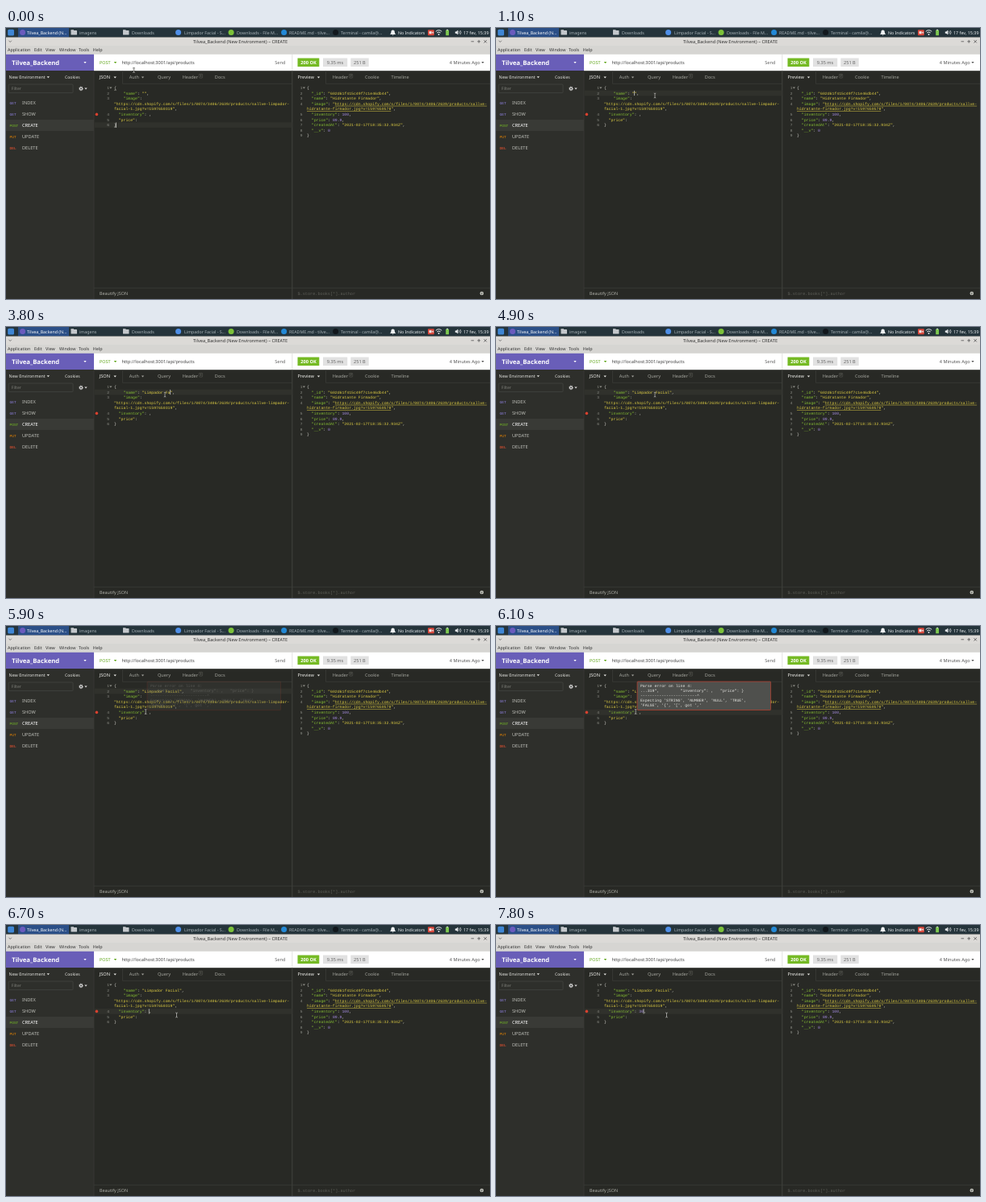
Write an HTML page that moves like this. It is 600 by 337 pixels and loops after 8000 ms.

```html
<!DOCTYPE html>
<html lang="en">
<head>
<meta charset="utf-8">
<title>API client</title>
<style>
html, body { margin: 0; width: 100%; height: 100%; overflow: hidden; background: #282925; }
svg { display: block; width: 100vw; height: 100vh; }
text { white-space: pre; font-family: "Noto Sans", "Open Sans", sans-serif; text-rendering: geometricPrecision; }
.mono { font-family: "Liberation Mono", "DejaVu Sans Mono", monospace; }
.key { fill: #86bf33; }
.str { fill: #dccb43; }
.num { fill: #a48be0; }
.pun { fill: #d6d6d0; }
.url { text-decoration: underline; text-decoration-thickness: .5px; }
</style>
</head>
<body>
<svg id="stage" viewBox="0 0 600 337" preserveAspectRatio="none"></svg>
<script>
const LOOP = 8000;
const CW = 2.9, ROW = 6.6, CODE_SIZE = CW / 0.6;
const LEFT = 133.9, RIGHT = 373;
const stage = document.getElementById('stage');

const rowTop = row => 71.1 + row * ROW;
const rect = (x, y, w, h, fill, more = '') =>
  `<rect x="${x}" y="${y}" width="${w}" height="${h}" fill="${fill}" ${more}/>`;
const disc = (x, y, r, fill, more = '') =>
  `<circle cx="${x}" cy="${y}" r="${r}" fill="${fill}" ${more}/>`;
const path = (d, stroke, width = 0.8, more = '') =>
  `<path d="${d}" fill="none" stroke="${stroke}" stroke-width="${width}" ${more}/>`;
const solid = (d, fill) => `<path d="${d}" fill="${fill}"/>`;
const text = (x, y, str, size, fill, more = '') =>
  `<text x="${x}" y="${y}" font-size="${size}" fill="${fill}" ${more}>${str}</text>`;
const mono = (x, y, str, size, fill, more = '') =>
  text(x, y, str, size, fill, 'class="mono" ' + more);
const arrow = (x, y, fill) => solid(`M${x - 1.7} ${y - 0.9}h3.4l-1.7 2z`, fill);

// parts: alternating class name and text
function code(x, row, indent, ...parts) {
  let spans = '';
  for (let i = 0; i < parts.length; i += 2) {
    const [cls, id] = parts[i].split('#');
    spans += `<tspan class="${cls}" ${id ? `id="${id}"` : ''}>${parts[i + 1]}</tspan>`;
  }
  return mono(x + indent * CW, 76 + row * ROW, spans, CODE_SIZE, '#d6d6d0');
}

function gutter(x, rows) {
  return rows.map((row, i) =>
    mono(x, 75.9 + row * ROW, i + 1, 4.6, '#90918a', 'text-anchor="end"')).join('') +
    arrow(x + 1.8, 74.4, '#90918a');
}

function desktopPanel() {
  const lit = '#eef1f3';
  const tasks = [
    [17, 26, '#6a5bbd', 'Tilvea_Backend (N...'],
    [80.5, 91, '#c3c7cb', 'imagens'],
    [145, 156, '#c3c7cb', 'Downloads'],
    [210, 221, '#4f8fe8', 'Limpador Facial - S...'],
    [275.5, 286, '#7cc23a', 'Downloads - File M...'],
    [341, 351, '#2489d6', 'README.md - tilve...'],
    [405, 415, '#12171c', 'Terminal - camila@...']
  ];
  let s = rect(0, 0, 600, 11.5, '#25343b') + rect(15, 0, 63, 11.5, '#2b4f87') +
    rect(2.2, 1.8, 7.8, 7.8, '#3f86d4', 'rx="1.5"');
  tasks.forEach(([ix, tx, fill, label], i) => {
    s += i === 1 || i === 2
      ? rect(ix, 3, 7.5, 5.6, fill, 'rx=".6"') + rect(ix, 2.2, 3.5, 1.5, fill)
      : disc(ix + 3.6, 5.6, 3.5, fill);
    s += text(tx, 7.5, label, 5.3, i ? '#a9b3b8' : '#ffffff');
  });
  return s +
    solid('M476 8q1.4-1 1.4-3.2a2.2 2.2 0 0 1 4.4 0q0 2.2 1.4 3.2zM478.6 8.5h2l-1 1z', lit) +
    text(486, 7.5, 'No Indicators', 5.25, lit) +
    rect(523, 2.2, 7.8, 7, '#d9463a', 'rx=".8"') + rect(524.6, 4.2, 3, 3, lit) +
    solid('M528 5.7l1.9-1.5v3z', lit) +
    path('M532.8 4.3q3.7-3.2 7.4 0M534.3 6q2.2-1.9 4.4 0', lit, 1) + disc(536.5, 8, 0.9, lit) +
    rect(545.2, 2.6, 3.8, 6.6, '#7ec850', 'rx=".5"') + rect(546.2, 1.8, 1.8, 1, lit) +
    solid('M556.8 4.5h1.5l2-1.9v6l-2-1.9h-1.5z', lit) +
    path('M561.5 4.1q1.2 1.5 0 3M563 3q2.2 2.6 0 5.2', lit, 0.7) +
    text(567, 7.5, '17 fev, 15:39', 5.4, lit);
}

function windowBars() {
  const menu = [[2, 'Application'], [35, 'Edit'], [49, 'View'], [66, 'Window'], [90, 'Tools'], [107.8, 'Help']];
  return rect(0, 11.5, 600, 10.5, '#dcdad7') + rect(0, 22, 600, 11, '#d6d5d2') +
    path('M3.5 15.7l1.7 1.8 1.7-1.8', '#666') +
    text(290.5, 18.5, 'Tilvea_Backend (New Environment) – CREATE', 5.6, '#333', 'text-anchor="middle"') +
    path('M576.5 16.8h3.6M584.3 16.8h3.8M586.2 14.9v3.8M592.5 15.1l3.4 3.4M595.9 15.1l-3.4 3.4', '#555', 0.8) +
    menu.map(([x, label]) => text(x, 29.1, label, 5.4, '#333')).join('');
}

function toolbar() {
  return rect(0, 32.8, 109, 20.4, '#695eb8') + rect(109, 32.8, 491, 20.4, '#fff') +
    text(7.3, 45.6, 'Tilvea_Backend', 7.7, '#fff', 'font-weight="600"') + arrow(98, 43, '#fff') +
    text(116, 45, 'POST', 5.4, '#59a210') + arrow(135.5, 43, '#59a210') +
    text(143.5, 45, 'http://localhost:3001/api/products', 5.62, '#444') +
    text(333.2, 45, 'Send', 5.7, '#666') +
    path('M354.8 32.8v20.4', '#d5d5d5', 0.7) +
    rect(361.5, 37.5, 26.8, 10.6, '#75ba24') +
    text(375, 45, '200 OK', 5.7, '#fff', 'font-weight="600" text-anchor="middle"') +
    rect(393, 37.5, 30.2, 10.6, '#e1e1e1') +
    text(408, 45, '9.35 ms', 5.6, '#666', 'text-anchor="middle"') +
    rect(427.3, 37.5, 22.4, 10.6, '#e1e1e1') +
    text(438.4, 45, '251 B', 5.6, '#666', 'text-anchor="middle"') +
    text(549.8, 45, '4 Minutes Ago', 5.6, '#555') + arrow(591, 43, '#555');
}

function sidebar() {
  const items = [
    ['GET', 'INDEX', '#8f80e0'], ['GET', 'SHOW', '#8f80e0'], ['POST', 'CREATE', '#75ba24'],
    ['PUT', 'UPDATE', '#ec8702'], ['DEL', 'DELETE', '#ff5631']
  ];
  return rect(0, 53.2, 109, 284, '#2e2f2b') +
    text(3.6, 63, 'New Environment', 5.4, '#e4e4e0') + arrow(52.3, 61.1, '#e4e4e0') +
    text(73, 63, 'Cookies', 5.1, '#e4e4e0') +
    rect(3.2, 70, 79.8, 10.6, 'none', 'rx="1" stroke="#4b4c47" stroke-width=".6"') +
    text(6.8, 77.2, 'Filter', 5.1, '#7f807a') +
    disc(93, 75.4, 1.5, 'none', 'stroke="#ddd" stroke-width="1.1"') +
    disc(93, 75.4, 2.3, 'none', 'stroke="#ddd" stroke-width=".9" stroke-dasharray=".9 .9"') +
    arrow(99, 75.3, '#ddd') +
    rect(0, 114, 109, 14, '#393a36') +
    items.map(([verb, name, fill], i) =>
      mono(4.5, 94.7 + 14 * i, verb, 4.5, fill) +
      text(20, 95.1 + 14 * i, name, 5.65, i === 2 ? '#fff' : '#bfc0ba')).join('') +
    path('M109 53.2V337', '#3d3e39', 0.6);
}

function tabs() {
  const dim = '#a3a49d', lit = '#eeeeea', edge = '#41423d';
  const badge = (x, n) => rect(x - 2.1, 57.3, 4.2, 4.8, 'none', 'rx=".7" stroke="#62635d" stroke-width=".5"') +
    text(x, 61.1, n, 3.7, dim, 'text-anchor="middle"');
  return text(115.7, 63.3, 'JSON', 5.7, lit) + arrow(135.2, 61.3, lit) +
    text(152.7, 63.3, 'Auth', 5.5, dim) + arrow(169.5, 61.3, dim) +
    text(188, 63.3, 'Query', 5.6, dim) + text(218.7, 63.3, 'Header', 5.6, dim) + badge(241.5, 1) +
    text(258.8, 63.3, 'Docs', 5.6, dim) +
    text(361.5, 63.3, 'Preview', 5.6, lit) + arrow(387.5, 61.3, lit) +
    text(404.7, 63.3, 'Header', 5.6, dim) + badge(427.6, 7) +
    text(445, 63.3, 'Cookie', 5.5, dim) + text(477.5, 63.3, 'Timeline', 5.5, dim) +
    path('M144.5 53.2V69.3H354.5M396.5 53.2V69.3H600', edge, 0.6) +
    path('M354.8 53.2V337', '#4a4b46', 0.8);
}

function footer() {
  return path('M109 323.3H600', '#41423d', 0.6) +
    text(116, 332, 'Beautify JSON', 5.4, '#b0b1aa') +
    mono(361.5, 331.7, '$.store.books[*].author', 5.2, '#5d5e58') +
    disc(589.8, 330, 2.3, '#c4c5be') +
    text(589.8, 331.6, '?', 4, '#282925', 'text-anchor="middle" font-weight="700"');
}

function request() {
  return rect(109.4, 0, 245, ROW, '#30312c', 'id="active"') +
    gutter(128, [0, 1, 2, 5, 6, 7]) +
    disc(112.4, 107.4, 1.8, '#d8412f') +
    code(LEFT, 0, 0, 'pun', '{') +
    code(LEFT, 1, 4, 'key', '"name"', 'pun', ': ', 'str#name', '""', 'pun', ',') +
    code(LEFT, 2, 4, 'key', '"image"', 'pun', ':') +
    code(LEFT, 3, 0, 'str', '"https://cdn.shopify.com/s/files/1/0074/3406/2639/products/sallve-limpador-') +
    code(LEFT, 4, 0, 'str', 'facial-1.jpg?v=1597650319"', 'pun', ',') +
    code(LEFT, 5, 2, 'key', '"inventory"', 'pun', ': ', 'num#stock', '', 'pun', ',') +
    code(LEFT, 6, 2, 'str#price', '"price"', 'pun', ':') +
    code(LEFT, 7, 0, 'pun', '}') +
    path('M134 77.3h2.9M134 123.4h2.9', '#b5b5ad', 0.5, 'id="match"') +
    rect(-0.3, 0, 0.6, 6.2, '#f4f4f0', 'id="caret"');
}

function response() {
  return gutter(367.6, [0, 1, 2, 3, 5, 6, 7, 8, 9]) +
    code(RIGHT, 0, 0, 'pun', '{') +
    code(RIGHT, 1, 2, 'key', '"_id"', 'pun', ': ', 'str', '"602d61f415c49f7c1e46db44"', 'pun', ',') +
    code(RIGHT, 2, 2, 'key', '"name"', 'pun', ': ', 'str', '"Hidratante Firmador"', 'pun', ',') +
    code(RIGHT, 3, 2, 'key', '"image"', 'pun', ': ', 'str', '"',
      'str url', 'https://cdn.shopify.com/s/files/1/0074/3406/2639/products/sallve-') +
    code(RIGHT, 4, 0, 'str url', 'hidratante-firmador.jpg?v=1597650578', 'str', '"', 'pun', ',') +
    code(RIGHT, 5, 2, 'key', '"inventory"', 'pun', ': ', 'num', '100', 'pun', ',') +
    code(RIGHT, 6, 2, 'key', '"price"', 'pun', ': ', 'num', '89.9', 'pun', ',') +
    code(RIGHT, 7, 2, 'key', '"createdAt"', 'pun', ': ', 'str', '"2021-02-17T18:35:32.934Z"', 'pun', ',') +
    code(RIGHT, 8, 2, 'key', '"__v"', 'pun', ': ', 'num', '0') +
    code(RIGHT, 9, 0, 'pun', '}');
}

function tooltip() {
  const lines = [
    'Parse error on line 4:',
    '...319",' + ' '.repeat(9) + '"inventory": ,' + ' '.repeat(3) + '"price": }',
    '-'.repeat(24) + '^',
    "Expecting 'STRING', 'NUMBER', 'NULL', 'TRUE',",
    "'FALSE', '{', '[', got ','"
  ];
  return '<g id="tip">' +
    rect(0, -35.4, 165.5, 35.4, '#4f504d', 'rx=".8" stroke="#c2412f" stroke-width=".7"') +
    lines.map((line, i) => mono(3.8, -28.9 + 6.15 * i, line, 4.87, '#e6e6e2')).join('') + '</g>';
}

function pointer() {
  const beam = 'M-1.3-3q1.3 0 1.3.8V2.2Q0 3-1.3 3M1.3-3Q0-3 0-2.2M0 2.2Q0 3 1.3 3';
  return '<g id="mouse">' + path(beam, '#15150f', 1.5, 'opacity=".75"') + path(beam, '#f2f2f2', 0.6) + '</g>';
}

stage.innerHTML = rect(0, 0, 600, 337, '#282925') + desktopPanel() + windowBars() + toolbar() +
  sidebar() + tabs() + footer() + request() + response() + tooltip() + pointer();

const el = {};
for (const id of ['active', 'name', 'stock', 'price', 'match', 'caret', 'tip', 'mouse'])
  el[id] = document.getElementById(id);

// Step tables: [time, value...]
const typed = [[0, 0], [1700, 1], [1900, 2], [2000, 3], [2100, 4], [2200, 5], [2500, 6], [2800, 7],
  [2900, 8], [3300, 9], [3500, 10], [3800, 11], [4000, 12], [4100, 13], [4300, 15]];
const digits = [[0, 0], [7400, 1], [7600, 2]];
const caretOn = [[0, 1], [500, 0], [900, 1], [1400, 0], [1700, 1], [4900, 0], [6500, 1], [7000, 0], [7400, 1]];
const caretSpot = [[0, 7, 1], [900, 1, 13], [6000, 5, 15]];
const route = [[0, 158.5, 52.5], [600, 174, 81], [800, 174, 81], [1100, 197, 84], [5200, 197, 84],
  [5700, 173.2, 106.7], [6100, 173.2, 106.5], [6400, 178.4, 107.3], [6700, 211.5, 112], [LOOP, 211.5, 112]];
const tipAlpha = [[0, 0], [5800, 0.05], [5900, 0.22], [6000, 0.6], [6100, 1], [6200, 0.9], [6300, 0.6],
  [6400, 0.35], [6500, 0.12], [6600, 0]];

const step = (table, t) => table.findLast(entry => entry[0] <= t).slice(1);

function along(table, t) {
  const i = table.findIndex(entry => entry[0] > t);
  const [a, b] = [table[i - 1], table[i]];
  const k = (t - a[0]) / (b[0] - a[0]);
  const e = k * k * (3 - 2 * k);
  return [1, 2].map(j => a[j] + (b[j] - a[j]) * e);
}

function draw(now) {
  const t = Math.floor((now % LOOP) / 100) * 100;
  const [letters] = step(typed, t), [count] = step(digits, t);
  const [row, col] = step(caretSpot, t);
  const [x, y] = along(route, t);
  const extra = row === 1 ? letters : row === 5 ? count : 0;

  el.name.textContent = '"' + 'Limpador Facial'.slice(0, letters) + '"';
  el.stock.textContent = '30'.slice(0, count);
  el.price.setAttribute('class', t >= 7800 ? 'key' : 'str');
  el.match.setAttribute('opacity', t < 900 ? 1 : 0);
  el.active.setAttribute('y', rowTop(row));
  el.caret.setAttribute('opacity', step(caretOn, t)[0]);
  el.caret.setAttribute('transform', `translate(${LEFT + (col + extra) * CW - 0.2} ${rowTop(row) + 0.2})`);
  el.mouse.setAttribute('transform', `translate(${x} ${y})`);
  el.tip.setAttribute('opacity', step(tipAlpha, t)[0]);
  el.tip.setAttribute('transform', `translate(${x + 1.9} ${y - 2})`);
}

const start = performance.now();
function tick() {
  draw(performance.now() - start);
  requestAnimationFrame(tick);
}
tick();
</script>
</body>
</html>
```
